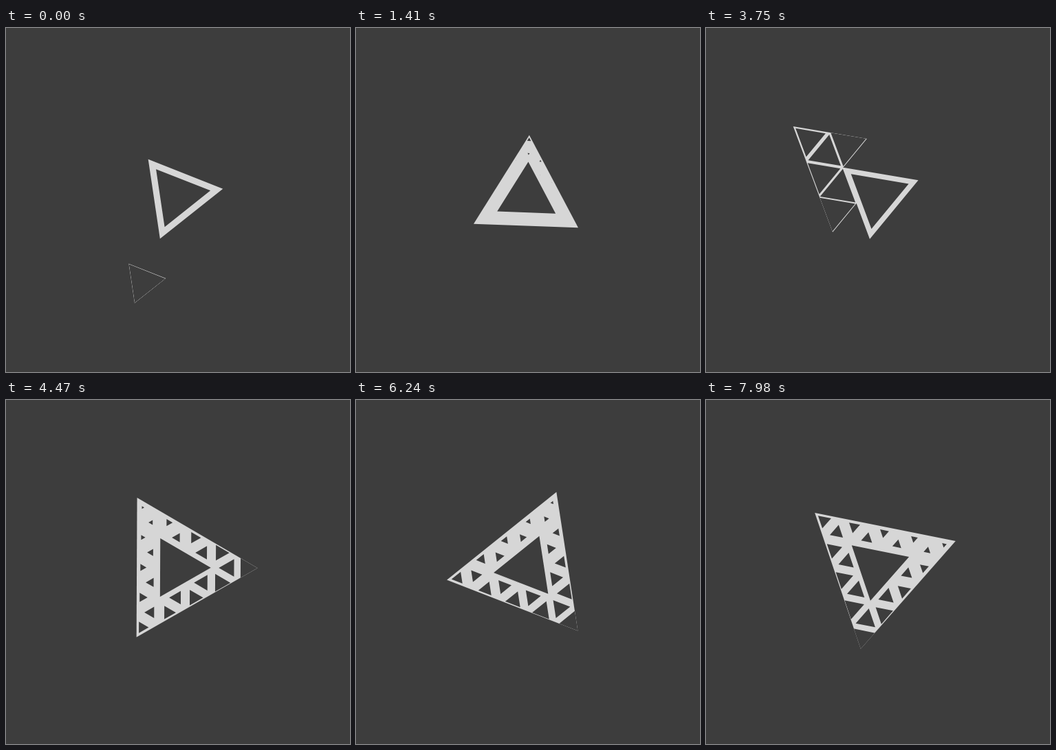
These frames come from a looping animation (500 px wide and 500 px high, 8 s). An HTML page with a canvas:

```html
<!DOCTYPE html>
<html lang="en">
<head>
<meta charset="utf-8">
<title>Dividing triangle</title>
<style>
  html, body { margin: 0; width: 100%; height: 100%; overflow: hidden; background: #3d3d3d; }
  canvas { display: block; }
</style>
</head>
<body>
<canvas id="stage" width="500" height="500"></canvas>
<script>
const ctx = document.getElementById('stage').getContext('2d');
const DARK = '#3d3d3d', LIGHT = '#d6d6d6';
const LOOP = 8, CYCLE = 12.5 / 7, LEAD = 0.025;
const TURN_START = -8.5, TURN_RATE = 28.8;
const UNIT = 58.8, CORE_HOLE = 85;
const SHRINK = 0.57, STAGGER = 0.405;
const OVERLAP = 0.3;

const corners = [0, 1, 2].map(k => {
  const a = k * 2 * Math.PI / 3;
  return [Math.cos(a), Math.sin(a)];
});

// Cells of a five-row triangle, without the two-row core in the middle.
function ringCells() {
  const cells = [];
  for (const [sum, offset, sign] of [[4, 1 / 3, 1], [3, 2 / 3, -1]]) {
    for (let i = 0; i <= sum; i++) {
      for (let j = 0; i + j <= sum; j++) {
        const index = [i, j, sum - i - j];
        if (Math.min(...index) >= 1) continue;
        const weights = index.map(n => n + offset);
        const sweep = (weights[2] + weights[0] / 2) / 5;
        cells.push({
          x: weights.reduce((s, w, k) => s + w * corners[k][0], 0) / Math.sqrt(3),
          y: weights.reduce((s, w, k) => s + w * corners[k][1], 0) / Math.sqrt(3),
          sign,
          delay: STAGGER * (sweep - 0.1)
        });
      }
    }
  }
  return cells;
}
const cells = ringCells();

function triangle(x, y, side, sign = 1) {
  const r = sign * side / Math.sqrt(3);
  corners.forEach(([cx, cy], k) => {
    ctx[k ? 'lineTo' : 'moveTo'](x + r * cx, y + r * cy);
  });
  ctx.closePath();
}

function draw(t) {
  const p = ((t + LEAD) % CYCLE) / CYCLE;
  const pitch = UNIT * (1 - p / 2);
  const started = cells.filter(cell => p > cell.delay);

  ctx.fillStyle = DARK;
  ctx.fillRect(0, 0, 500, 500);
  ctx.save();
  ctx.translate(248.6, 243.6);
  ctx.rotate((TURN_START + TURN_RATE * t) * Math.PI / 180);

  ctx.beginPath();
  triangle(0, 0, UNIT * (5 - 3 * p));
  ctx.clip();

  // The slight overlap keeps neighbouring cells free of seams.
  ctx.fillStyle = LIGHT;
  ctx.beginPath();
  triangle(0, 0, 2 * pitch);
  for (const { x, y, sign } of started) {
    triangle(x * pitch, y * pitch, pitch + OVERLAP, sign);
  }
  ctx.fill();

  ctx.fillStyle = DARK;
  ctx.beginPath();
  triangle(0, 0, CORE_HOLE);
  for (const { x, y, sign, delay } of started) {
    const side = pitch * (1 - (p - delay) / SHRINK);
    if (side > 0) triangle(x * pitch, y * pitch, side, sign);
  }
  ctx.fill();
  ctx.restore();
}

function tick() {
  draw((performance.now() / 1000) % LOOP);
  requestAnimationFrame(tick);
}
tick();
</script>
</body>
</html>
```
